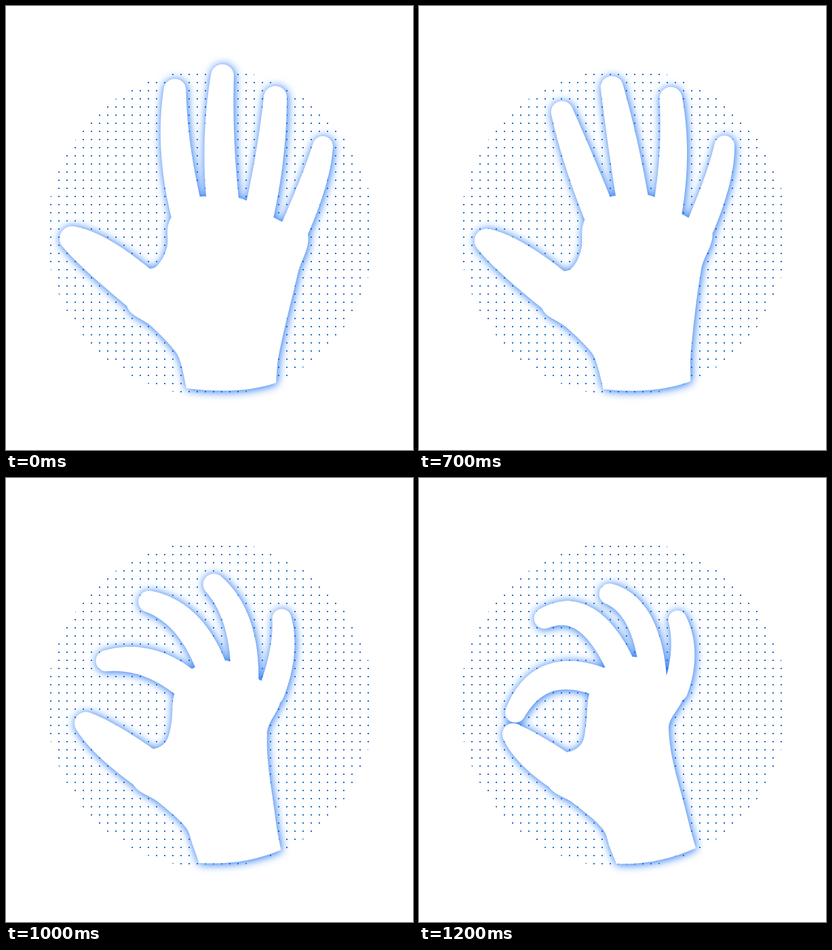
Write an HTML page with a canvas that moves like this. It is 600 px wide and 655 px high and loops after 1700 ms.

```html
<!DOCTYPE html>
<html lang="en">
<head>
<meta charset="utf-8">
<title>Hand gesture</title>
<style>
  html, body { margin: 0; width: 100%; height: 100%; overflow: hidden; background: #fff; }
  canvas { display: block; }
</style>
</head>
<body>
<canvas id="stage" width="600" height="655"></canvas>
<script>
const ctx = document.getElementById('stage').getContext('2d');
const LOOP = 1700;

// Each finger is a curve over base, knuckle and tip, given for the open and the
// pinched hand. `fold` shortens it while it swings towards the viewer.
const fingers = [
  { open: [[195, 415], [130, 361], [97, 343]], pinched: [[212, 435], [164, 403], [139, 378]], radii: [32, 18], fold: -0.1 },
  { open: [[268, 310], [243, 210], [249, 124]], pinched: [[262, 299], [178, 270], [142, 346]], radii: [24, 16.5], fold: 0.29 },
  { open: [[322, 310], [309, 205], [319, 103]], pinched: [[305, 295], [255, 173], [185, 207]], radii: [24, 17], fold: 0.19 },
  { open: [[370, 320], [392, 225], [397, 135]], pinched: [[345, 290], [335, 190], [281, 171]], radii: [22, 17], fold: 0.05 },
  { open: [[425, 330], [458, 255], [467, 207]], pinched: [[378, 312], [398, 256], [381, 209]], radii: [21, 15], fold: 0.02 },
];

// Palm edge from the left wrist corner to the right one: open and pinched place.
const palm = [
  [[266, 564], [291, 569]], [[258, 528], [282, 547]], [[250, 510], [271, 518]],
  [[215, 473], [228, 480]], [[178, 442], [190, 453]], [[188, 378], [185, 391]],
  [[207, 387], [211, 405]], [[222, 384], [238, 394]], [[237, 357], [246, 366]],
  [[240, 320], [250, 323]], [[262, 290], [258, 300]], [[289, 281], [274, 279]],
  [[347, 284], [319, 264]], [[404, 317], [360, 289]], [[444, 333], [390, 316]],
  [[430, 395], [368, 370]], [[402, 515], [396, 502]], [[398, 556], [408, 546]],
];
const wristCurve = [[345, 574], [350, 572]];

const mix = (a, b, t) => a + (b - a) * t;
const mixPoint = (p, q, t) => [mix(p[0], q[0], t), mix(p[1], q[1], t)];
const distance = (p, q) => Math.hypot(q[0] - p[0], q[1] - p[1]);
const angle = (p, q) => Math.atan2(q[1] - p[1], q[0] - p[0]);

function addPalm(t) {
  const points = palm.map(([open, pinched]) => mixPoint(open, pinched, t));
  const at = n => points[Math.max(0, Math.min(points.length - 1, n))];
  const handle = (n, side) => {
    const p = at(n), prev = at(n - 1), next = at(n + 1);
    const k = side * 0.34 * distance(p, at(n + side)) / distance(prev, next);
    return [p[0] + (next[0] - prev[0]) * k, p[1] + (next[1] - prev[1]) * k];
  };
  ctx.moveTo(...at(0));
  for (let n = 0; n < points.length - 1; n++) {
    ctx.bezierCurveTo(...handle(n, 1), ...handle(n + 1, -1), ...at(n + 1));
  }
  ctx.quadraticCurveTo(...mixPoint(...wristCurve, t), ...at(0));
}

// Turns and scales the bone that starts at joint n.
function boneEnd(start, { open, pinched, fold }, n, t) {
  const from = angle(open[n], open[n + 1]);
  const turn = angle(pinched[n], pinched[n + 1]) - from;
  const shortest = Math.atan2(Math.sin(turn), Math.cos(turn));
  const heading = from + shortest * t;
  const length = mix(distance(open[n], open[n + 1]), distance(pinched[n], pinched[n + 1]), t)
    * (1 - fold * 4 * t * (1 - t));
  return [start[0] + length * Math.cos(heading), start[1] + length * Math.sin(heading)];
}

function addFinger(finger, t, palmT) {
  const base = mixPoint(finger.open[0], finger.pinched[0], palmT);
  const knuckle = boneEnd(base, finger, 0, t);
  const tip = boneEnd(knuckle, finger, 1, t);
  const [wide, narrow] = finger.radii;
  for (let s = 0; s <= 1; s += 1 / 128) {
    const [x, y] = mixPoint(mixPoint(base, knuckle, s), mixPoint(knuckle, tip, s), s);
    const radius = mix(wide, narrow, s * s) * (1 - 0.1 * t);
    ctx.moveTo(x + radius, y);
    ctx.arc(x, y, radius, 0, Math.PI * 2);
  }
}

function drawHand(t) {
  const palmT = t ** 0.75; // the palm leads the fingers
  ctx.save();
  ctx.shadowColor = '#0f68ee';
  ctx.shadowBlur = 14;
  ctx.shadowOffsetX = ctx.shadowOffsetY = 1;
  ctx.fillStyle = '#fff';
  ctx.beginPath();
  addPalm(palmT);
  fingers.forEach(finger => addFinger(finger, t, palmT));
  ctx.fill();
  ctx.restore();
}

function drawDots() {
  ctx.save();
  ctx.beginPath();
  ctx.arc(301.5, 334, 241.5, 0, Math.PI * 2);
  ctx.clip();
  ctx.fillStyle = '#1670d8';
  for (let row = 0; row < 40; row++) {
    for (let col = 0; col < 40; col++) {
      ctx.fillRect(65 + col * 12, Math.round(99.5 + row * 12.02), 2, 2);
    }
  }
  ctx.restore();
}

function frame() {
  const time = performance.now() % LOOP;
  // Seven 100 ms steps between two rests.
  const u = Math.max(0, Math.min(7, Math.floor(time / 100) - 5)) / 7;
  ctx.fillStyle = '#fff';
  ctx.fillRect(0, 0, 600, 655);
  drawDots();
  drawHand(u * u * (2 - u));
  requestAnimationFrame(frame);
}
frame();
</script>
</body>
</html>
```
